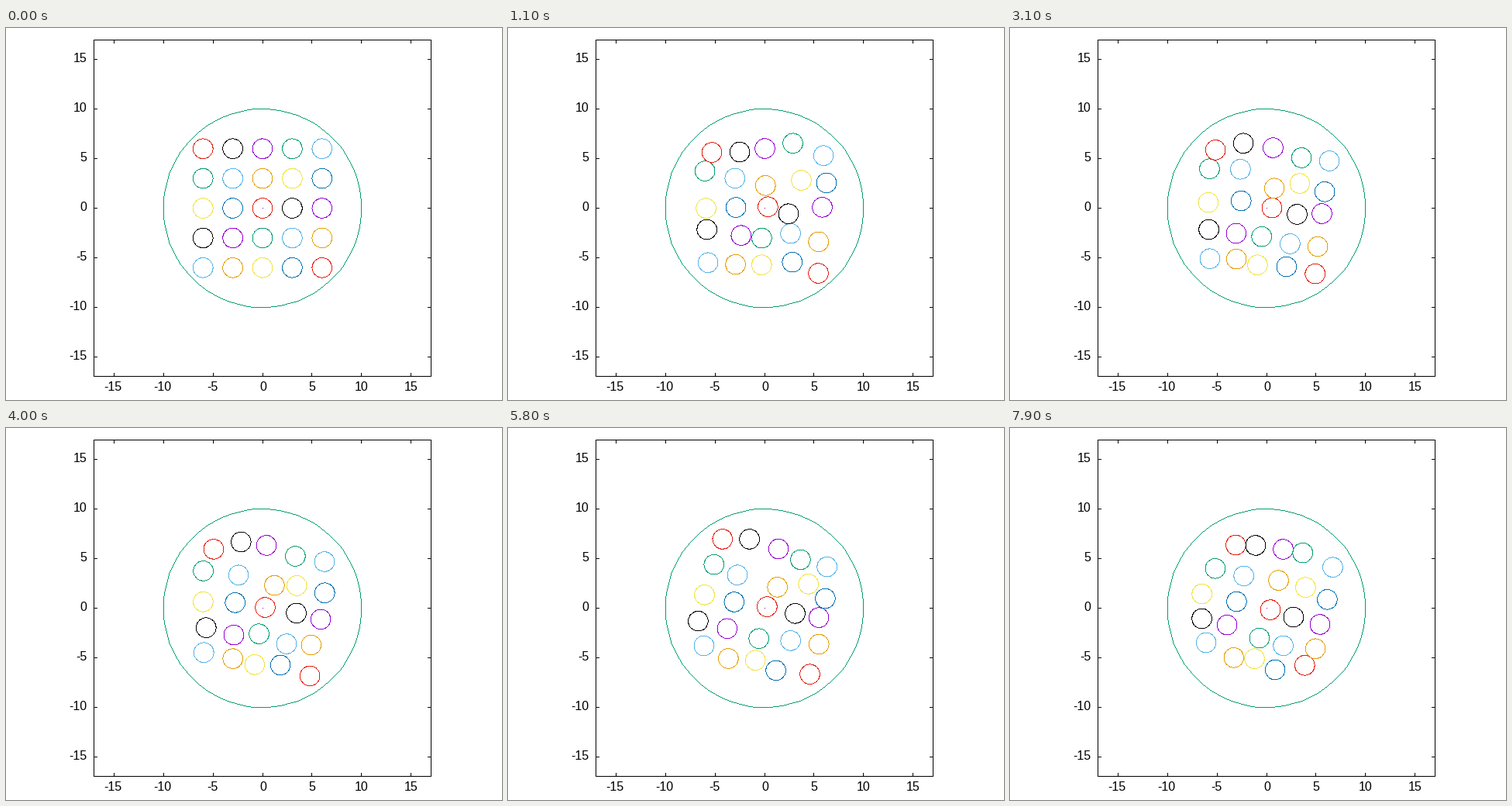
Write a matplotlib script that moves like this. It is 640x480 px and loops after 8000 ms.

```python
import numpy as np
import matplotlib.pyplot as plt
from matplotlib.animation import FuncAnimation
from matplotlib.collections import PolyCollection

plt.rcParams["font.family"] = "Liberation Sans"

W, H, DPI = 640, 480, 80
FRAMES, INTERVAL = 80, 100
PX = 72 / DPI                                # one pixel in points
LEFT, RIGHT, TOP, BOTTOM = 113, 548, 15, 449
CENTER = np.array([(LEFT + RIGHT) / 2, (TOP + BOTTOM) / 2])
UNIT = (RIGHT - LEFT) / 34 * np.array([1, -1])
WALL = 10
SWIRL, ROUNDING = 0.24, 0.145                # reached at the end of the loop
STEP, PULL = 0.11, 0.04                      # random step, return to the flow
COLORS = ["#9400d3", "#009e73", "#56b4e9", "#e69f00",
          "#f0e442", "#0072b2", "#e51e10", "#000000"]
GRID = np.array([(x, y) for y in range(-6, 7, 3) for x in range(-6, 7, 3)])


def flow(k):
    """Grid that slowly turns clockwise while its corners round off."""
    s = (k / (FRAMES - 1)) ** 0.7
    x, y = (GRID * (1 - ROUNDING * s * (GRID[:, ::-1] / 6) ** 2)).T
    c, d = np.cos(SWIRL * s), np.sin(SWIRL * s)
    return np.column_stack([c * x + d * y, c * y - d * x])


def separate(pos):
    """Push overlapping discs apart and keep them inside the wall."""
    for _ in range(20):
        diff = pos[:, None] - pos
        dist = np.hypot(diff[..., 0], diff[..., 1])
        np.fill_diagonal(dist, 1e9)
        push = np.maximum(0, 2 - dist) / 2 / dist
        pos = pos + (diff * push[..., None]).sum(axis=1)
        r = np.hypot(pos[:, 0], pos[:, 1])
        pos = pos * np.minimum(1, (WALL - 1) / r.clip(1))[:, None]
    return pos


def walk():
    """Random walk of hard discs carried by the flow."""
    rng = np.random.default_rng(11)
    path = [flow(0)]
    for k in range(1, FRAMES):
        pos, old = path[-1], flow(k - 1)
        drift = flow(k) - old + PULL * (old - pos)
        path.append(separate(pos + drift + rng.normal(0, STEP, pos.shape)))
    return path


def to_pixel(p):
    return np.floor(CENTER + UNIT * p + 0.5)


def circle(center, radius):
    """Polygon corners of a circle on whole pixels."""
    a = np.linspace(0, 2 * np.pi, 100)
    return to_pixel(center + radius * np.column_stack([np.cos(a), np.sin(a)]))


def trace(corners):
    """Pixels on the straight lines that join the corners."""
    runs = [np.linspace(p, q, int(abs(q - p).max()) + 1)
            for p, q in zip(corners, corners[1:])]
    return np.floor(np.concatenate(runs) + 0.5)


def squares(pixels):
    return pixels[:, None] + np.array([(0, 0), (1, 0), (1, 1), (0, 1)])


fig = plt.figure(figsize=(W / DPI, H / DPI), dpi=DPI, facecolor="white")
ax = fig.add_axes([0, 0, 1, 1])
ax.set_xlim(0, W)
ax.set_ylim(H, 0)
ax.axis("off")


def dots(pixels, color):
    return ax.add_collection(PolyCollection(
        squares(pixels), facecolors=color, edgecolors="none", linewidths=0,
        antialiaseds=False), autolim=False)


def line(x, y):
    ax.plot(x, y, color="black", lw=PX, antialiased=False, snap=True,
            solid_joinstyle="miter")


def label(x, y, text, ha):
    ax.text(x, y, text, ha=ha, va="baseline", fontsize=16 * PX)


dots(to_pixel(np.zeros((1, 2))), COLORS[0])
dots(trace(circle(np.zeros(2), WALL)), COLORS[1])
discs = [dots(circle(p, 1), COLORS[(i + 2) % 8]) for i, p in enumerate(GRID)]

line([LEFT, RIGHT, RIGHT, LEFT, LEFT], [BOTTOM, BOTTOM, TOP, TOP, BOTTOM])
for v in range(-15, 16, 5):
    x, y = to_pixel(np.array([v, v]))
    for edge, d in ((TOP, 4), (BOTTOM, -4)):
        line([x, x], [edge, edge + d])
    for edge, d in ((LEFT, 4), (RIGHT, -4)):
        line([edge, edge + d], [y, y])
    label(x + (1 if v >= 0 else -1), 468.5, str(v), "center")
    label(104.5, y + 4.5, str(v), "right")

PATH = walk()


def update(k):
    for disc, center in zip(discs, PATH[k]):
        disc.set_verts(squares(circle(center, 1)))
    return discs


anim = FuncAnimation(fig, update, frames=FRAMES, init_func=lambda: update(0),
                     interval=INTERVAL, repeat=True, repeat_delay=0)
plt.show()
```
